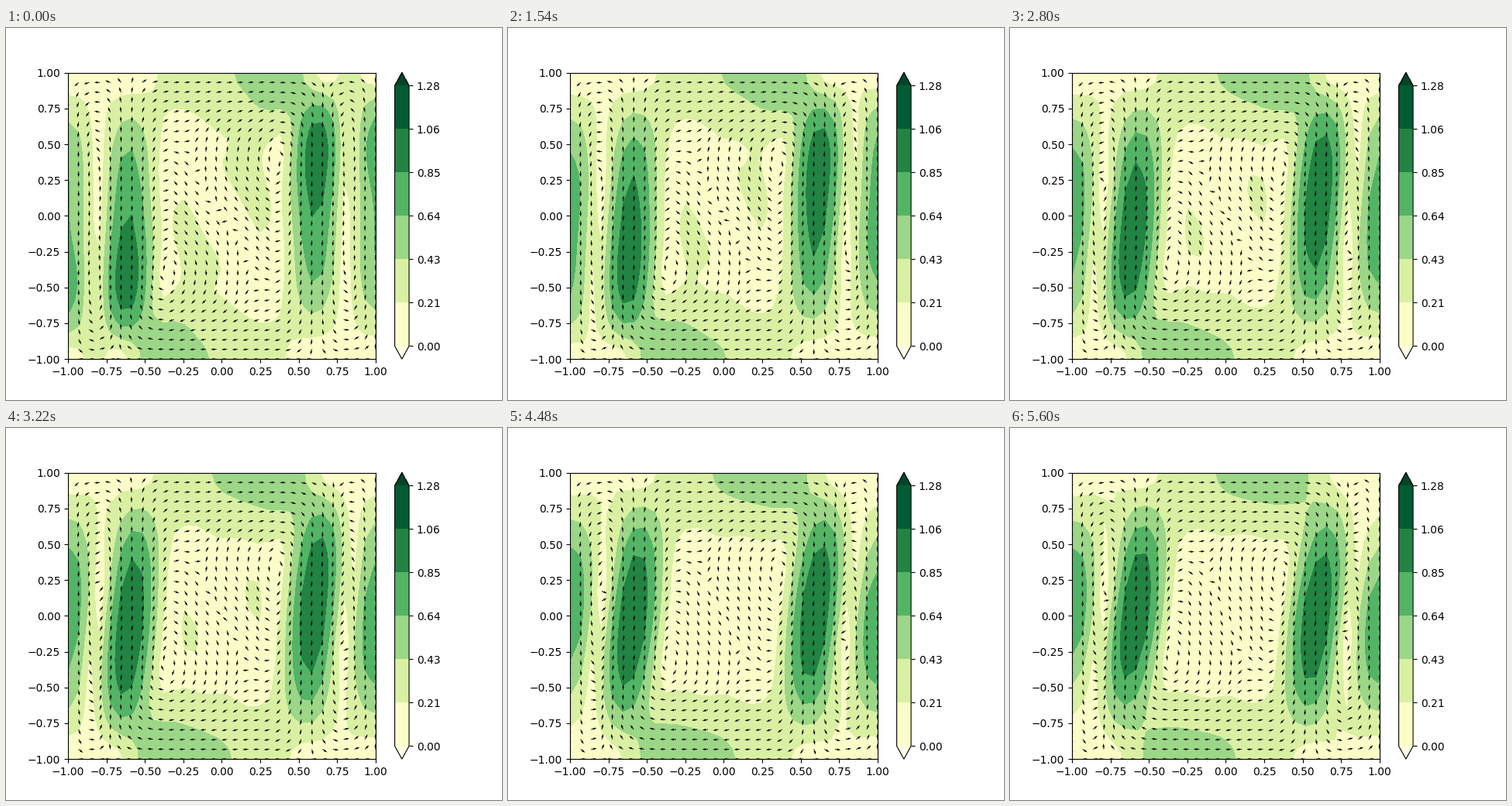
Write a matplotlib script that moves like this. It is 640 px wide and 480 px high and loops after 5.74 s.

```python
import numpy as np
import matplotlib.pyplot as plt
from matplotlib.animation import FuncAnimation

FRAMES, STEP = 41, 140
GRID = 30

# standing waves of a closed box: (m, n, first amplitude, last amplitude)
MODES = [(1, 1, .24, .28), (3, 1, -.26, -.36), (5, 1, -.62, -.62),
         (7, 1, -.20, -.13), (9, 1, .05, .06),
         (1, 3, .04, .04), (3, 3, -.06, -.01), (5, 3, -.07, .035),
         (7, 3, -.05, -.01),
         (2, 2, .12, .165), (4, 2, -.13, .07), (6, 2, -.07, -.04),
         (8, 2, -.02, -.09), (6, 4, -.04, 0)]

axis = np.linspace(-1, 1, GRID)
X, Y = np.meshgrid(axis, axis)
PX, PY = (X + 1) * np.pi / 2, (Y + 1) * np.pi / 2


def flow(i):
    """Divergence-free velocity with no flow through the walls."""
    t = i / (FRAMES - 1)
    ease = t * (1.25 - .25 * t)
    swell = 1 + .2 * t * (1 - t)
    u, v = np.zeros_like(X), np.zeros_like(X)
    for m, n, first, last in MODES:
        amp = swell * (first + (last - first) * ease)
        u -= amp * n / m * np.sin(m * PX) * np.cos(n * PY)
        v += amp * np.cos(m * PX) * np.sin(n * PY)
    speed = np.hypot(u, v)
    return speed, u / (speed + 1e-9), v / (speed + 1e-9)


fig, ax = plt.subplots(figsize=(6.4, 4.8), dpi=100)
levels = np.linspace(0, 1.277, 7)


def fill(speed):
    return ax.contourf(X, Y, speed, levels=levels, cmap="YlGn", extend="both")


speed, u, v = flow(0)
field = fill(speed)
fig.colorbar(field, ax=ax, format="%.2f")
arrows = ax.quiver(X, Y, u, v, scale=54, width=0.0024, zorder=2)
ax.set(xlim=(-1, 1), ylim=(-1, 1))


def draw(i):
    global field
    speed, u, v = flow(i)
    field.remove()
    field = fill(speed)
    arrows.set_UVC(u, v)
    return field, arrows


anim = FuncAnimation(fig, draw, frames=FRAMES, interval=STEP,
                     repeat=True, repeat_delay=0, blit=False)
plt.show()
```
